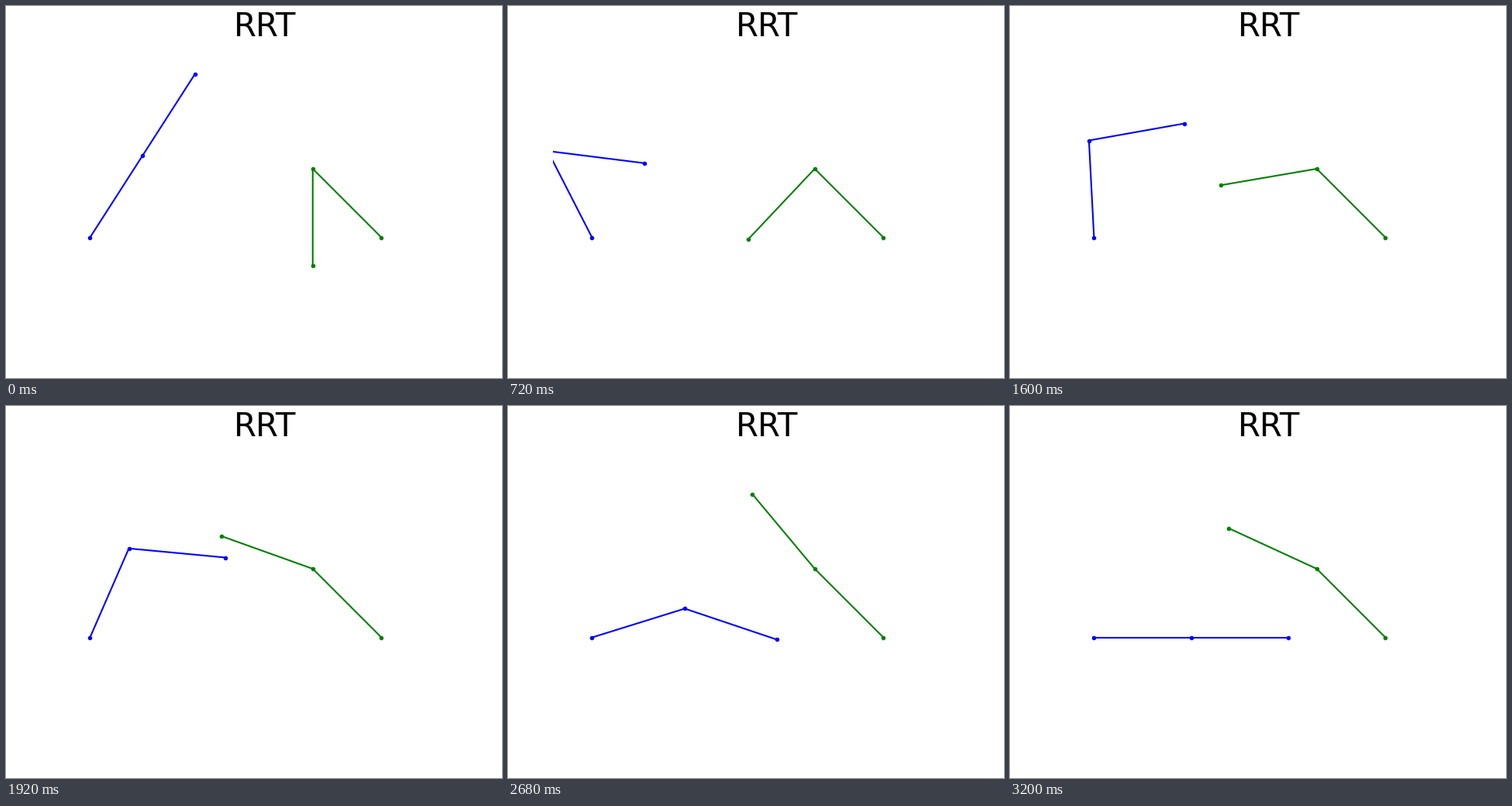
A matplotlib script for the animation above (4.04 s loop, 640 px wide and 480 px high).

```python
import numpy as np
import matplotlib.pyplot as plt
from matplotlib.animation import FuncAnimation

W, H, DPI = 640, 480, 100
UNIT = 376 / 3                      # pixels per link length
XLIM, YLIM = (-0.4, 4.0), (-1.2, 2.0)
TOP = 0.9 * H
ORIGIN = (108.4, TOP - YLIM[1] * UNIT)  # pixel position of (0, 0)

FRAMES, STEP_MS = 101, 40
STEPS = 20                          # frames per path edge

# Joint space path: left shoulder, left elbow, right forearm heading (radians)
PATH = np.array([
    [1.0, 0.0, -np.pi / 2],
    [2.16, -2.41, -2.411],
    [1.623, -1.447, -2.972],
    [0.464, -0.963, -4.255],
    [0.0, 0.0, -3.573],
])
RIGHT_SHOULDER = 3 * np.pi / 4


def config(i):
    s = min(i / STEPS, len(PATH) - 1)
    return [np.interp(s, np.arange(len(PATH)), q) for q in PATH.T]


def arm(base, headings):
    """Joint positions of a chain of unit links."""
    x = base + np.cumsum([0, *np.cos(headings)])
    y = np.cumsum([0, *np.sin(headings)])
    return x, y


fig = plt.figure(figsize=(W / DPI, H / DPI), dpi=DPI, facecolor="white")
ax = fig.add_axes([
    (ORIGIN[0] + XLIM[0] * UNIT) / W,
    (ORIGIN[1] + YLIM[0] * UNIT) / H,
    (XLIM[1] - XLIM[0]) * UNIT / W,
    (YLIM[1] - YLIM[0]) * UNIT / H,
])
ax.set(xlim=XLIM, ylim=YLIM)
ax.axis("off")
ax.set_title("RRT", fontsize=30, fontfamily="DejaVu Sans")

left, = ax.plot([], [], ".-", color="blue", lw=1.5, ms=6)
right, = ax.plot([], [], ".-", color="green", lw=1.5, ms=6)


def update(i):
    shoulder, elbow, forearm = config(i)
    left.set_data(*arm(0, [shoulder, shoulder + elbow]))
    right.set_data(*arm(3, [RIGHT_SHOULDER, forearm]))
    return left, right


anim = FuncAnimation(fig, update, frames=FRAMES, interval=STEP_MS,
                     repeat=True, repeat_delay=0)
plt.show()
```
